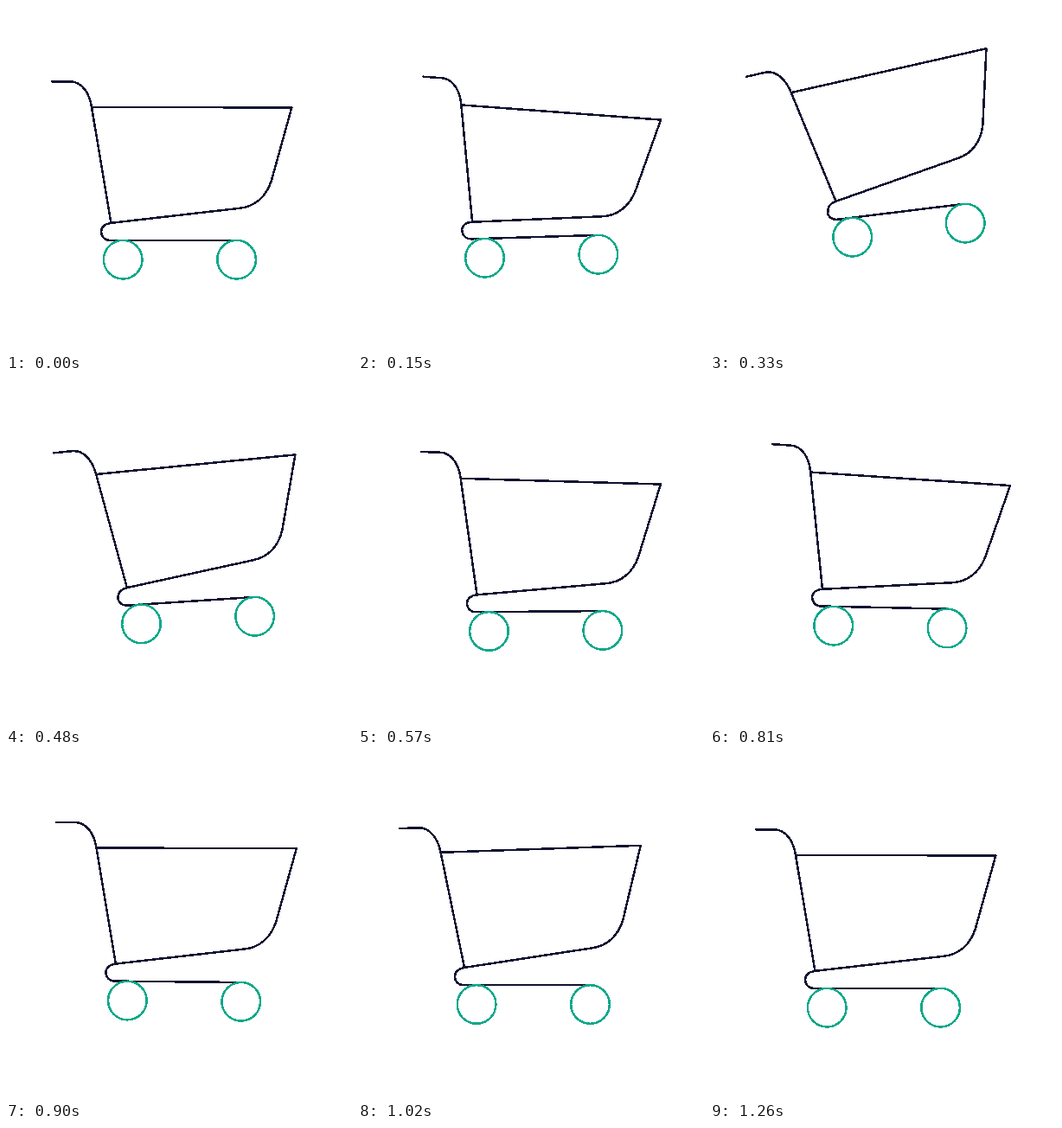
Write an HTML page that moves like this. It is 400 px wide and 400 px high and loops after 3290 ms.

```html
<!DOCTYPE html>
<html lang="en">
<head>
<meta charset="utf-8">
<title>Cart</title>
<style>
  html, body { margin: 0; height: 100%; overflow: hidden; background: #fff; }
  svg { display: block; width: 100%; height: 100%; }
  g { fill: none; stroke: #121331; stroke-width: 2.5; stroke-linecap: round; stroke-linejoin: round; shape-rendering: crispEdges; }
  circle { stroke: #08a88a; }
</style>
</head>
<body>
<svg viewBox="0 0 400 400">
  <g id="base">
    <path d="M110 261C110 266.5 114.5 270.9 120 270.9H266.6"/>
    <circle cx="135.2" cy="293.2" r="22.3"/>
    <circle cx="266.6" cy="293.2" r="22.3"/>
  </g>
  <g id="basket">
    <path d="M53 87.3H74C88 87.3 96.5 101 99 116.8L121.3 250.5"/>
    <path d="M99 116.8L330.3 117.5L306.8 202C301 220 288 232 270 233.8L121 250.9C114 251.7 110 256 110 261"/>
  </g>
</svg>
<script>
const LOOP = 3290, STEP = 30;
const base = document.getElementById('base');
const basket = document.getElementById('basket');

const smooth = u => (1 - Math.cos(Math.PI * u)) / 2;
const fall = u => u * u;
const rise = u => u * (2 - u);
const glide = u => u ** 0.85;

// Each key is [time, value, easing into it]
function track(keys, t) {
  const i = keys.findIndex(k => k[0] > t);
  if (i < 0) return keys[keys.length - 1][1];
  if (i === 0) return keys[0][1];
  const [t0, v0] = keys[i - 1], [t1, v1, ease = smooth] = keys[i];
  return v0 + (v1 - v0) * ease((t - t0) / (t1 - t0));
}

const moveX = [[10, 0], [330, 25.7], [1085, 0, glide]];
const moveY = [[115, 0], [330, -24], [528, 0, fall], [805, -9.4, rise], [1082, 0, fall]];
const tiltBase = [[60, 0], [330, -7], [690, 1.7], [1030, 0]];
const tiltBasket = [[0, 0], [140, 4.2], [330, -12.9], [690, 6.3], [1010, -2.25], [1090, 0]];

function pose(part, x, y, angle, pivot) {
  part.setAttribute('transform', `translate(${x} ${y}) rotate(${angle} ${pivot})`);
}

function draw(now) {
  const t = Math.floor((now % LOOP) / STEP) * STEP;
  const x = track(moveX, t), y = track(moveY, t);
  pose(base, x, y, track(tiltBase, t), '120 261');
  pose(basket, x, y, track(tiltBasket, t), '116 257');
}

let start;
function tick(now) {
  start ??= now;
  draw(now - start);
  requestAnimationFrame(tick);
}
draw(0);
requestAnimationFrame(tick);
</script>
</body>
</html>
```
